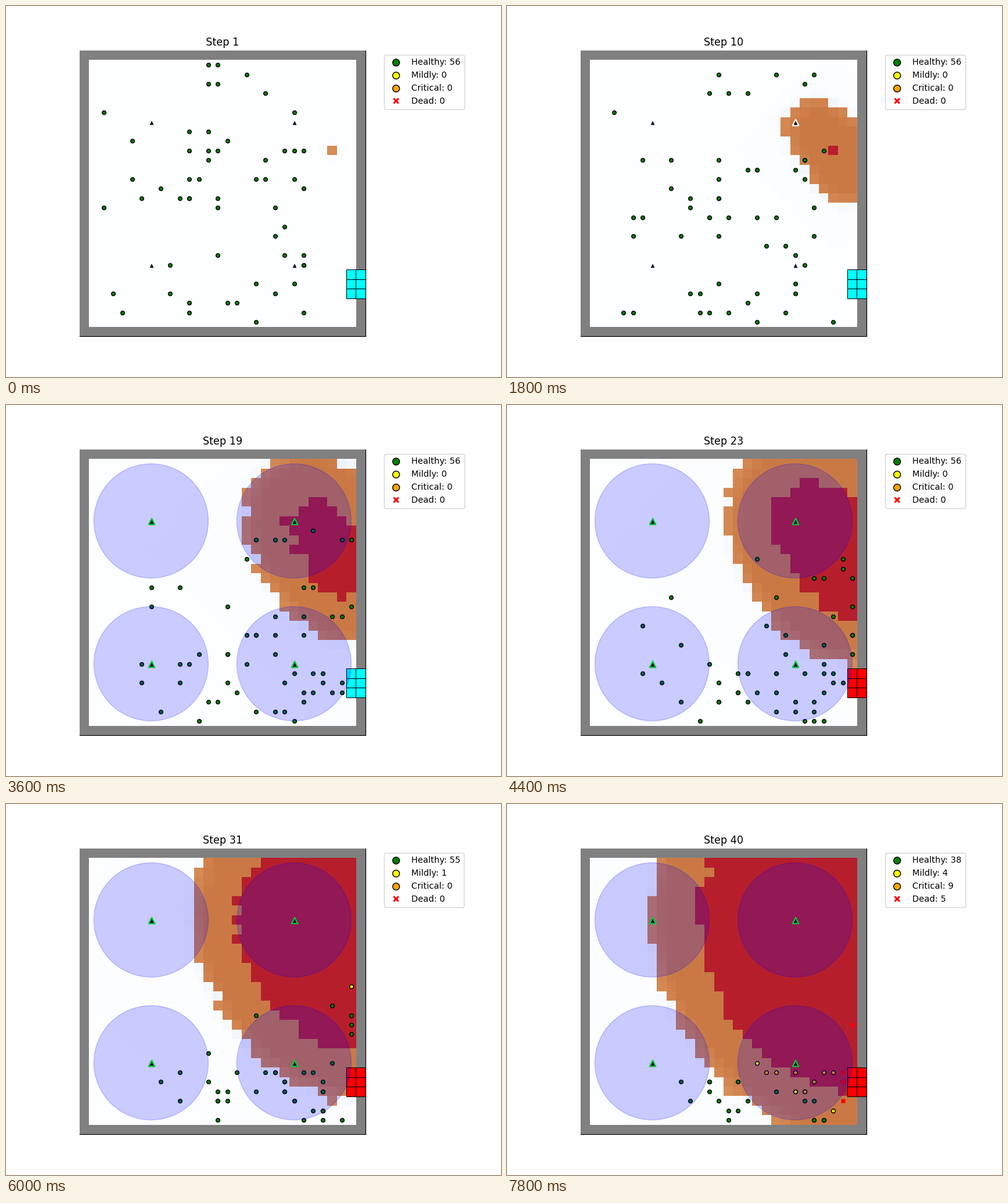
Write a matplotlib script that moves like this. It is 800 px wide and 600 px high and loops after 8000 ms.

```python
import numpy as np
import matplotlib.pyplot as plt
from matplotlib.animation import FuncAnimation
from matplotlib.lines import Line2D
from matplotlib.patches import Circle, Rectangle

N = 30
STEPS = 40
CROWD = 56
ALARM_STEP, EXIT_SHUT_STEP, BURNOUT = 11, 23, 10
SPARK = (26, 10)
ALARMS = [(7, 7), (22, 7), (7, 22), (22, 22)]
COLORS = {"healthy": "green", "mild": "yellow", "critical": "orange", "dead": "red"}


def ignition_steps(rng):
    """Step at which each cell catches fire: a ring, skewed along one diagonal."""
    row, col = np.mgrid[:N, :N]
    dx, dy = SPARK[0] - col, row - SPARK[1]
    dist, angle = np.hypot(dx, dy), np.arctan2(dy, dx)
    skew = 3.4 * np.sin(2 * angle + 0.3) * np.clip(dist / 4, 0, 1)
    ragged = rng.normal(0, 0.6, (N, N)) * (dist > 0)
    steps = 2.06 * dist + skew + ragged
    return np.where(dist > 0, np.maximum(steps, 1.5), 0)


def spread_smoke(ignite):
    smoke, out = np.zeros((N, N)), []
    for step in range(STEPS + 1):
        pad = np.pad(smoke[1:-1, 1:-1], 1, mode="edge")
        near = (np.roll(pad, 1, 0) + np.roll(pad, -1, 0)
                + np.roll(pad, 1, 1) + np.roll(pad, -1, 1))
        smoke = pad + 0.22 * (near - 4 * pad)
        smoke[ignite <= step] += 0.25
        smoke = np.clip(smoke, 0, 1)
        out.append(smoke)
    return out


def injuries(step):
    """Numbers of mild, critical and dead people."""
    mild = np.interp(step, [30, 36], [0, 4])
    critical = np.interp(step, [30, 36, 40], [0, 3, 9])
    dead = np.interp(step, [36, 40], [0, 5])
    return [int(round(n)) for n in (mild, critical, dead)]


def pace(step):
    """Chance of a step towards the exit, sideways and downwards."""
    if step < ALARM_STEP + 2:
        return 0.15, 0.12
    if step < EXIT_SHUT_STEP + 3:
        return 0.5, 0.8
    return 0.2, 0.6


def walk(rng, ignite):
    """Cells and states of everyone still inside, for each step."""
    x = 1 + (27 * rng.beta(1.7, 1.8, CROWD)).astype(int)
    y = 1 + (28 * rng.beta(1.4, 1.0, CROWD)).astype(int)
    goal_row = 23 + np.arange(CROWD) % 6
    inside = np.ones(CROWD, bool)
    hurt, out = [], []
    for step in range(1, STEPS + 1):
        mild, critical, dead = injuries(step)
        # The people longest in the fire are hurt first and worst.
        for person in np.argsort(ignite[y, x]):
            if len(hurt) < mild + critical + dead and inside[person] and person not in hurt:
                hurt.append(person)
        state = np.full(CROWD, "healthy", dtype="<U8")
        state[hurt] = ["dead"] * dead + ["critical"] * critical + ["mild"] * mild
        out.append((x[inside], y[inside], state[inside]))

        px, py = pace(step)
        stroll = rng.integers(-1, 2, (2, CROWD)) * (rng.random((2, CROWD)) < 0.5)
        to_x = np.where(rng.random(CROWD) < px, np.sign(28 - x), stroll[0])
        to_y = np.where(rng.random(CROWD) < py, np.sign(goal_row - y), stroll[1])
        able = state != "dead"
        x = np.clip(x + to_x * able, 1, 28)
        y = np.clip(y + to_y * able, 1, 28)
        well = np.ones(CROWD, bool)
        well[hurt] = False
        inside &= ~(well & (x >= 28) & (y >= 22))
    return out


IGNITE = ignition_steps(np.random.default_rng(4))
SMOKE = spread_smoke(IGNITE)
PEOPLE = walk(np.random.default_rng(12), IGNITE)


def blend(a, b, t):
    return np.array(a) + (np.array(b) - np.array(a)) * t[..., None]


def room(step):
    smoke = SMOKE[step]
    rgb = blend((253, 254, 255), (212, 228, 243), smoke)
    burning = IGNITE <= step
    rgb[burning] = blend((221, 150, 95), (202, 121, 69), smoke)[burning]
    rgb[IGNITE <= step - BURNOUT] = (183, 30, 44)
    rgb[[0, -1], :] = rgb[:, [0, -1]] = 128
    return rgb.astype(np.uint8)


def legend_mark(color, text, marker="o", edge="black"):
    return Line2D([], [], marker=marker, color="w", markerfacecolor=color,
                  markeredgecolor=edge, markersize=8, label=text)


fig = plt.figure(figsize=(8, 6), dpi=100)
ax = fig.add_axes([119 / 800, 66 / 600, 462 / 800, 462 / 600])


def draw(i):
    step = i + 1
    ax.clear()
    ax.imshow(room(step), extent=(0, N, N, 0), interpolation="nearest", aspect="auto")
    ax.set(xlim=(0, N), ylim=(N, 0), xticks=[], yticks=[])
    ax.spines[["left", "top"]].set_visible(False)
    ax.set_title(f"Step {step}", fontsize=12)

    # A slight nudge puts the door's lines on whole pixels.
    door = "red" if step >= EXIT_SHUT_STEP else "cyan"
    for col in (28, 29):
        for row in (23, 24, 25):
            ax.add_patch(Rectangle((col - 0.01, row + 0.01), 1, 1,
                                   facecolor=door, edgecolor="black", lw=0.7))

    ringing = step >= ALARM_STEP
    ax.scatter([c + 0.5 for c, _ in ALARMS], [r + 0.5 for _, r in ALARMS], s=50, marker="^",
               c="black", edgecolors="lime" if ringing else "white", linewidths=1.5, zorder=1)

    x, y, state = PEOPLE[i]
    for name, color in COLORS.items():
        who = state == name
        dead = name == "dead"
        ax.scatter(x[who] + 0.5, y[who] + 0.5, s=20, color=color, marker="X" if dead else "o",
                   edgecolors="red" if dead else "black", linewidths=1, zorder=1)

    if ringing:
        for c, r in ALARMS:
            ax.add_patch(Circle((c + 0.5, r + 0.5), 6, color="blue", alpha=0.2))

    mild, critical, dead = injuries(step)
    ax.legend(handles=[
        legend_mark("green", f"Healthy: {CROWD - mild - critical - dead}"),
        legend_mark("yellow", f"Mildly: {mild}"),
        legend_mark("orange", f"Critical: {critical}"),
        legend_mark("red", f"Dead: {dead}", "X", "w"),
    ], loc="upper left", bbox_to_anchor=(1.05, 1), fontsize=10)


anim = FuncAnimation(fig, draw, frames=STEPS, interval=200, repeat=True, repeat_delay=0)
plt.show()
```
